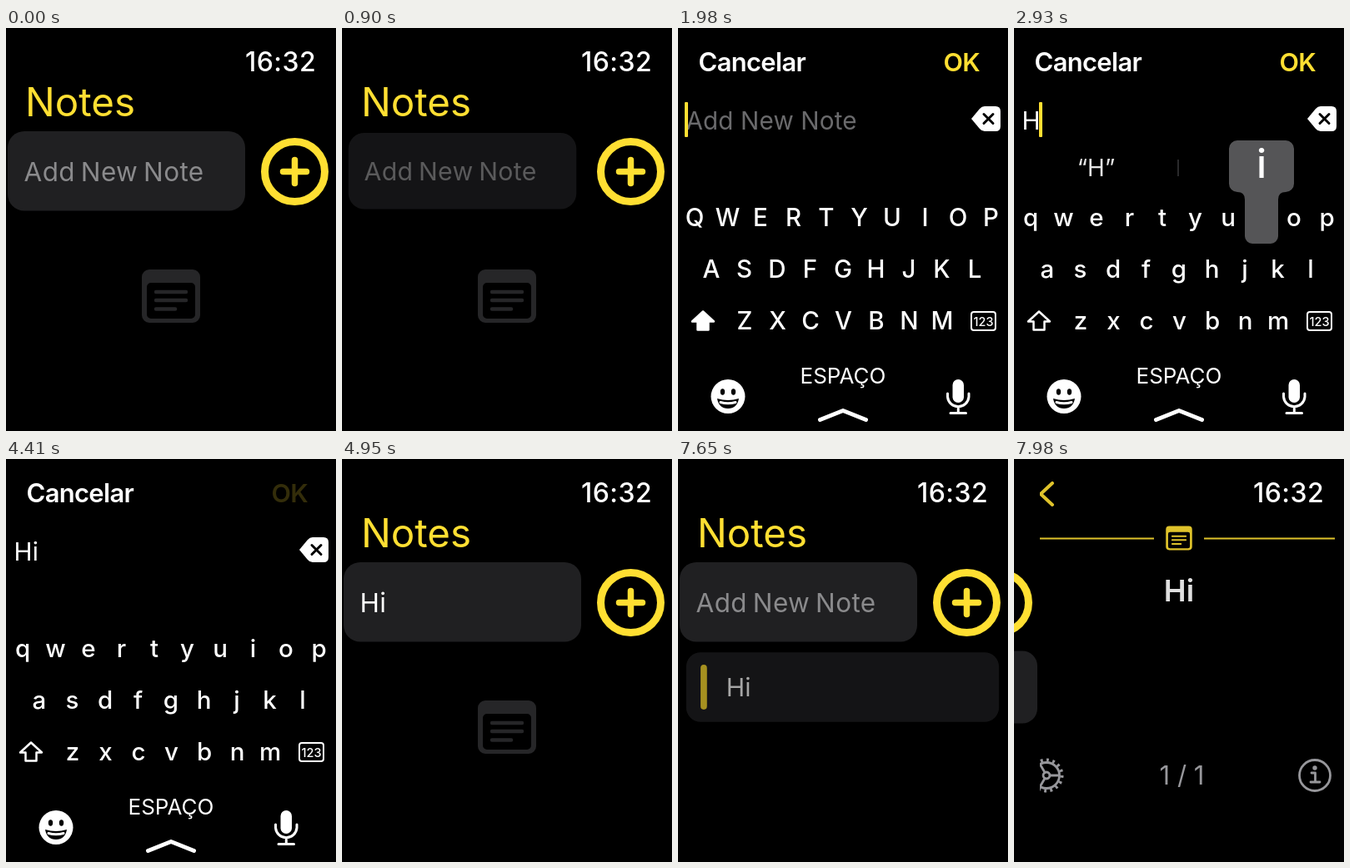
These frames come from a looping animation (396x484 px, 8 s). An HTML page:

```html
<!DOCTYPE html>
<html lang="en">
<head>
<meta charset="utf-8">
<title>Watch notes</title>
<style>
html, body { margin: 0; width: 100%; height: 100%; overflow: hidden; background: #000; }
svg { display: block; width: 396px; height: 484px; font-family: Inter, Roboto, sans-serif; fill: #fff; }
.mid { text-anchor: middle; }
.end { text-anchor: end; }
.w5 { font-weight: 500; }
.w6 { font-weight: 600; }
.tight { letter-spacing: -.7px; }
.loose { letter-spacing: .4px; word-spacing: -2.5px; }
.gold { fill: #ffdf32; }
.line { fill: none; stroke-linecap: round; stroke-linejoin: round; }
#field, #row { transform-box: fill-box; transform-origin: center; }
</style>
</head>
<body>
<svg viewBox="0 0 396 484">
  <defs>
    <g id="noteIcon" class="line" stroke="currentColor">
      <path fill="currentColor" stroke="none" fill-rule="evenodd" d="M-26-32H26a9 9 0 0 1 9 9V23a9 9 0 0 1-9 9H-26a9 9 0 0 1-9-9V-23a9 9 0 0 1 9-9ZM-24-16a5 5 0 0 0-5 5V22a5 5 0 0 0 5 5H24a5 5 0 0 0 5-5V-11a5 5 0 0 0-5-5Z"/>
      <path stroke-width="4.500" d="M-18-5H18M-18 5H18M-18 15.500H5"/>
    </g>
  </defs>
  <rect width="396" height="484" fill="#000"/>

  <g id="detail">
    <path class="line" stroke="#ffdf32" stroke-width="4" d="M46 29 32 42 46 55"/>
    <path stroke="#ffdf32" stroke-width="2" d="M11 95.500H168M228 95.500H385"/>
    <use href="#noteIcon" transform="translate(198 95) scale(.45)" color="#ffdf32"/>
    <text class="mid w6" x="198" y="171" font-size="36">Hi</text>
    <text class="mid" x="201.500" y="391" font-size="31" fill="#adadb2">1 / 1</text>
    <g class="line" stroke="#adadb2" stroke-width="2.800">
      <circle cx="361" cy="380" r="18.500"/>
      <path d="M357 377H361.500V388M356 388H367"/>
      <circle cx="361" cy="371" r="1.300"/>
      <g transform="translate(39 380)">
        <circle r="15.500"/>
        <circle r="18.500" stroke-width="4" stroke-linecap="butt" pathLength="160" stroke-dasharray="4 6"/>
        <circle r="4"/>
        <path d="M4 0H15M-2 3.500-7.500 13M-2-3.500-7.500-13"/>
      </g>
    </g>
  </g>

  <g id="home">
    <rect width="396" height="484" fill="#000"/>
    <text class="gold" x="23" y="106.300" font-size="47.500">Notes</text>
    <g id="field">
      <rect x="2" y="124" width="285" height="95.500" rx="20" fill="#202022"/>
      <text id="fieldText" class="loose" x="21.500" y="184" font-size="31.500"></text>
    </g>
    <g id="plus" class="line" stroke="#ffdf32">
      <circle cx="346.500" cy="172.500" r="36" stroke-width="9"/>
      <path stroke-width="7.500" d="M332.500 172.500h28M346.500 158.500v28"/>
    </g>
    <use id="empty" href="#noteIcon" x="198" y="322" color="#262628"/>
    <g id="row">
      <rect x="2" y="230.500" width="391" height="87" rx="18" fill="#202022"/>
      <rect class="gold" x="20" y="246" width="8" height="56" rx="4"/>
      <text x="52" y="285.500" font-size="31.500">Hi</text>
    </g>
  </g>
  <text class="end w5" x="372" y="52" font-size="32" letter-spacing=".4">16:32</text>

  <g id="sheet">
    <rect width="396" height="484" fill="#000"/>
    <text class="w6 tight" x="24.500" y="52" font-size="31">Cancelar</text>
    <text id="ok" class="end w6 tight" x="362" y="52" font-size="30.500" fill="#ffdf32">OK</text>
    <text id="typed" x="9.500" y="122" font-size="29.700" letter-spacing=".1"></text>
    <rect id="cursor" class="gold" y="89" width="4" height="42" rx="1"/>
    <path d="M352 109 362 97Q364.500 94 368 94H381Q387 94 387 100V118Q387 124 381 124H368Q364.500 124 362 121Z"/>
    <path class="line" stroke="#000" stroke-width="3" d="M367 103.500 378 114.500M378 103.500 367 114.500"/>
    <g id="hints">
      <text id="hint" class="mid" x="98.500" y="178" font-size="28" fill="#e6e6e6"></text>
      <path stroke="#2a2a2c" stroke-width="2" d="M197 158V178"/>
    </g>
    <g id="keys" class="mid w5" font-size="29.500"></g>
    <path id="shift" stroke="#fff" stroke-width="2.500" stroke-linejoin="round" d="M30 340.500 43 352.500H36.500V362.500H23.500V352.500H17Z"/>
    <rect x="352" y="341" width="29" height="22" rx="3" fill="none" stroke="#fff" stroke-width="2"/>
    <text class="mid w5" x="366.500" y="357.500" font-size="14.500">123</text>
    <text class="mid" x="198" y="427" font-size="26">ESPAÇO</text>
    <circle cx="60" cy="442.500" r="20.500"/>
    <g fill="#000">
      <ellipse cx="53.500" cy="437" rx="2.700" ry="3.700"/>
      <ellipse cx="66.500" cy="437" rx="2.700" ry="3.700"/>
      <path d="M47 445Q60 449 73 445 71 457 60 457 49 457 47 445Z"/>
    </g>
    <path class="line" stroke="#fff" stroke-width="3" d="M51 449.500Q60 452 69 449.500"/>
    <rect x="329.500" y="422" width="13.500" height="28" rx="6.700"/>
    <path class="line" stroke="#fff" stroke-width="3" d="M323.500 439V443A12.800 12.800 0 0 0 349 443V439M336.300 456V462.500M327 462.500H345.500"/>
    <path class="line" stroke="#fff" stroke-width="5" d="M170.500 470.500 198 459.500 225.500 470.500"/>
    <g id="popup">
      <path fill="#555557" d="M-29-62H29a10 10 0 0 1 10 10V-10A10 10 0 0 1 29 0Q20 0 20 9V53a9 9 0 0 1-9 9H-11a9 9 0 0 1-9-9V9Q-20 0-29 0A10 10 0 0 1-39-10V-52a10 10 0 0 1 10-10Z"/>
      <text id="popupText" class="mid w5" y="-17" font-size="48"></text>
    </g>
  </g>
</svg>
<script>
const LOOP = 8000, STEP = 110, PITCH = 39.5;
const $ = id => document.getElementById(id);
const show = (id, alpha) => $(id).setAttribute('opacity', +alpha);
const move = (id, x, y) => $(id).setAttribute('transform', `translate(${x} ${y})`);
const label = (el, text) => { if (el.textContent !== text) el.textContent = text; };
const press = (id, on) => {
  show(id, on ? 0.65 : 1);
  $(id).style.transform = on ? 'scale(.96)' : '';
};
const held = (t, start) => Math.floor((t - start + 0.01) / STEP) * STEP;

const keys = [['QWERTYUIOP', 20, 238], ['ASDFGHJKL', 40, 300], ['ZXCVBNM', 80, 362]]
  .flatMap(([row, x, y]) => [...row].map((char, i) => {
    const el = document.createElementNS('http://www.w3.org/2000/svg', 'text');
    el.setAttribute('x', x + i * PITCH);
    el.setAttribute('y', y);
    $('keys').append(el);
    return { el, char };
  }));

function sheetOffset(t) {
  if (t < 1010 || t >= 4950) return 484;
  if (t < 1450) return 450 * 5 ** (-held(t, 1010) / STEP);
  if (t < 4410) return 0;
  const p = held(t, 4410) / 550;
  return 484 * p * p * (3 - 2 * p);
}

function drawHome(t) {
  const added = t >= 6790;
  const typed = t >= 4410 && !added;
  label($('fieldText'), typed ? 'Hi' : 'Add New Note');
  $('fieldText').setAttribute('fill', typed ? '#fff' : '#8a8a8c');
  press('field', t >= 790 && t < 1010);
  show('plus', added && t < 6900 ? 0.7 : 1);
  show('empty', !added);
  press('row', t >= 7650 && t < 7760);
  if (t < 6900) show('row', added ? 0.5 : 0);

  const left = t < 7760 ? 396 : 31 * 2.85 ** (2 - held(t, 7760) / STEP);
  move('home', left - 396, 0);
  show('detail', 0.92 - left / 700);
}

function drawSheet(t) {
  const y = sheetOffset(t);
  move('sheet', 0, y);
  show('sheet', y < 484);
  const text = t < 2530 ? '' : t < 3150 ? 'H' : 'Hi';
  label($('typed'), text || 'Add New Note');
  $('typed').setAttribute('fill', text ? '#fff' : '#6a6a6c');
  $('cursor').setAttribute('x', [8, 30, 41][text.length]);

  const fade = t < 4110 ? 1 : t < 4230 ? 0.4 : 0;
  show('cursor', t < 1980 ? 0 : fade);
  label($('hint'), `“${text}”`);
  show('hints', text ? fade : 0);
  show('ok', t < 4410 ? 1 : 0.2);

  for (const { el, char } of keys) label(el, text ? char.toLowerCase() : char);
  $('shift').setAttribute('fill', text ? 'none' : '#fff');

  const pressH = t >= 2100 && t < 2530, pressI = t >= 2810 && t < 3150;
  show('popup', pressH || pressI);
  move('popup', pressH ? 237.5 : 297, pressH ? 259 : 197);
  label($('popupText'), pressH ? 'H' : 'i');
}

function frame() {
  const t = performance.now() % LOOP;
  drawHome(t);
  drawSheet(t);
  requestAnimationFrame(frame);
}
frame();
</script>
</body>
</html>
```
